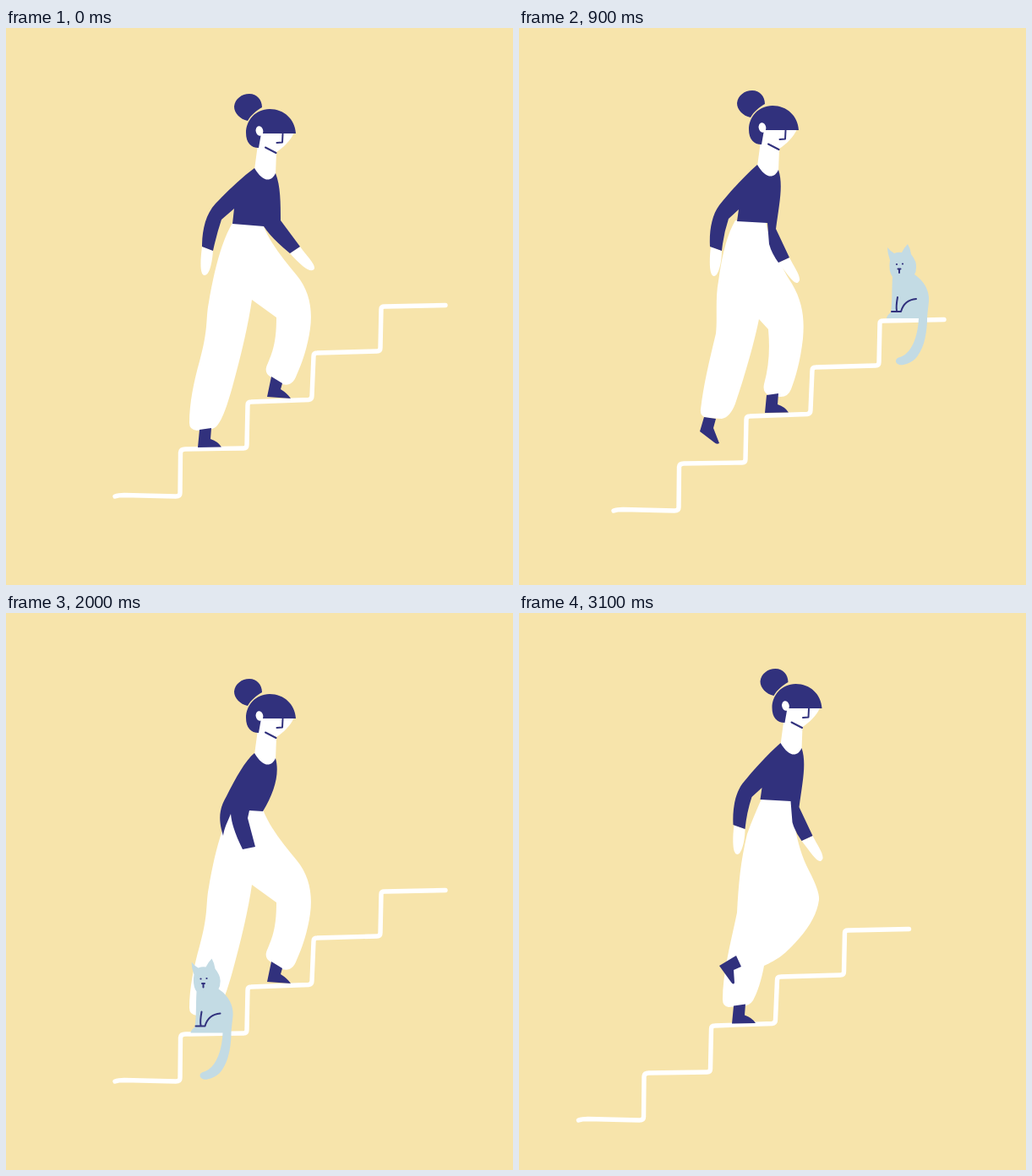
Animation, 600 px wide and 660 px high, one loop 3.2 s. Source, as an HTML page:

```html
<!DOCTYPE html>
<html lang="en">
<head>
<meta charset="utf-8">
<title>Climbing stairs</title>
<style>
  html, body { margin: 0; width: 100%; height: 100%; overflow: hidden; background: #f7e4ab; }
  svg { display: block; width: 100vw; height: 100vh; }
  .white { fill: #fff; }
  .navy { fill: #31317d; }
  .ink { fill: none; stroke: #31317d; stroke-width: 2; stroke-linecap: round; stroke-linejoin: round; }
  .stairs { fill: none; stroke: #fff; stroke-width: 5.4; stroke-linecap: round; stroke-linejoin: round; }
  .fur { fill: #c3dbe4; }
</style>
</head>
<body>
<svg viewBox="0 0 600 660">
  <path id="stairs" class="stairs" d="M129 555Q133 553.5 140 553.5L201 555Q206 555 206 551L206.5 503Q207 499 212 499L281 498Q285 498 285 494L286 447Q286 443 290 443L358 440.500Q362 440 362 436L364 389Q364 385 368 385L439 383Q443 383 443 379L444 333Q444 330 448 330L520 328.500"/>
  <path id="pants" class="white"/>
  <path id="stanceFoot" class="navy" d="M229 476L243 474L242 487Q251 490 255 496.500L227 497Z"/>
  <path id="swingFoot" class="navy"/>
  <g id="upper">
    <path id="hands" class="white"/>
    <path class="white" d="M298 122L341 124C337 133 328 142 320 147L319 174C317 184 303 184 294 168L298 138Z"/>
    <path class="navy" d="M286 110C277 108 270 101 270 93C271 84 279 78 288 78C297 78 303 85 303 94C296 98 290 103 286 110Z"/>
    <path class="navy" d="M343 125C342 108 329 96 312 96C295 96 284 110 284 124C284 136 290 142 299 142L302 125Z"/>
    <ellipse class="white" cx="300" cy="122" rx="4.300" ry="5.800" transform="rotate(-12 300 122)"/>
    <path class="ink" d="M327.500 125.500L327 135.500L320.500 136M307 141.500L319.500 148"/>
    <path id="shirt" class="navy"/>
  </g>
  <g id="cat">
    <path class="fur" d="M374 298Q378 303 382 305Q387 303 391 304Q394 298 398 294Q401 299 402 306Q409 315 408 322Q408 327 406 330C418 338 424 350 423 362C422 372 421 378 421 386C420 405 416 420 407 430C400 436 392 438 388 437C382 435 383 429 389 428C402 424 410 405 411 382L373 382Q373 379 378 375C380 362 379 350 380 333Q375 326 377 313Q374 305 374 298Z"/>
    <circle class="navy" cx="385" cy="318" r="1.100"/>
    <circle class="navy" cx="392" cy="317.500" r="1.100"/>
    <path class="ink" stroke-width="1.800" d="M386.500 323.500H389.500M388 323.500V328M386 357Q384 368 385 373M379 374H390Q394 360 408 359"/>
  </g>
</svg>
<script>
const FRAME = 100, FRAMES = 32, STEP = 4;
const el = id => document.getElementById(id);
const draw = (id, d) => el(id).setAttribute('d', d);
const move = (id, [x, y]) => el(id).setAttribute('transform', `translate(${x} ${y})`);

// Four phases of one stride
const phases = [
  {
    stairs: [0, 0], body: [0, 0], stance: [0, 0],
    pants: 'M268 231L304 233C313 256 330 276 344 293C359 311 363 333 360 356C357 378 350 398 344 411C340 422 334 424 327 422L314 414C307 410 306 405 310 397C317 381 320 368 320 343L291 322C287 350 279 385 268 425C262 446 257 462 250 471Q246 476 240 475L226 477Q217 476 217 468C217 445 222 420 229 395C240 355 236 345 240 325C246 290 254 255 268 231Z',
    foot: 'M314 413L327 421L325 428Q333 433 337 439L309 437Z'
  },
  {
    stairs: [-17, 17], body: [-12, -4], stance: [64, -41],
    pants: 'M256 228L292 230C297 255 311 285 323 303C336 325 338 345 336 368C333 395 327 415 322 428Q318 438 308 437L295 435Q288 431 290 422C296 400 297 380 295 357L284 345C279 370 268 410 256 445Q250 461 240 463L222 462Q214 460 215 452C218 425 225 395 233 362C235 345 232 320 236 300C240 270 246 245 256 228Z',
    foot: 'M219 461L233 463L230 474L237 492Q234 494 231 491L214 478Z'
  },
  {
    stairs: [-35, 32.5], body: [-17, -12], stance: [46.5, -25],
    pants: 'M250 224L286 224C290 255 297 290 306 325C313 345 313 360 311 378C309 400 305 430 301 441Q297 450 288 449L276 450Q270 449 270 443L268 398C263 412 254 432 245 441Q240 446 232 445Q220 443 221 434C225 405 231 375 237 342C233 315 232 290 232 262L244 260L247 232Z',
    foot: 'M225 443L239 446L236 457L243 474Q241 477 237 474L220 461Z'
  },
  {
    stairs: [-58.5, 46], body: [15.5, -12], stance: [25, -10.5],
    pants: 'M287 220L322 222C325 250 330 280 343 305Q356 330 355 340C353 355 345 370 332 385C315 405 305 411 290 418C287 435 282 450 277 459Q272 467 260 466L248 467Q241 466 241 458C241 425 252 385 258 355C260 320 262 295 270 262C276 245 282 232 287 220Z',
    foot: 'M237 418L257 406L263 419L254 423L255 438Q254 442 250 436Z'
  }
];

// Arm swing, from arms together to arms apart; all share the collar
const collar = 'M294 166C304 183 314 183 319 172';
const swings = [
  {
    shirt: 'C324 190 318 212 304 235L288 234L286 243L295 277L280 280C272 264 267 250 266 238C262 248 258 255 257 264C251 245 252 232 261 217C272 195 283 175 294 166Z',
    hands: ''
  },
  {
    shirt: 'C325 192 320 214 313 240L322 276L308 282C298 266 290 250 288 238L268 238C265 250 264 260 262 270L249 267C247 248 249 232 257 216C270 194 282 176 294 166Z',
    hands: 'M308 282L322 276C327 288 332 300 329 305C324 308 316 298 308 282Z'
  },
  {
    shirt: 'C326 190 322 212 317 243L332 277L320 283Q306 269 304 256L303 237L267 237L269 229L264 234Q261 252 261 272L245 269C243 252 244 231 253 217C265 198 279 178 294 166Z',
    hands: 'M247 269L261 272L260 290Q249 284 247 269ZM320 283L332 277C338 290 344 300 343 306C339 313 331 304 320 283Z'
  },
  {
    shirt: 'C325 190 320 212 316 242L332 276L319 282Q311 271 308 260L306 235L270 233L272 219L260 230Q254 248 252 268L238 263C237 245 240 226 249 214C262 198 279 179 294 166Z',
    hands: 'M239 263L252 268C252 282 248 298 243 298C237 298 237 280 239 263ZM319 282L332 276C337 286 345 297 344 303C340 312 333 300 319 282Z'
  },
  {
    shirt: 'C325 187 325 208 325 228L348 259L336 267Q314 249 305 235L268 232L270 214L255 227Q249 245 245 264L232 259C232 240 236 221 248 208C262 193 278 178 294 166Z',
    hands: 'M232 259L245 264C244 278 241 293 235 293C229 293 230 275 232 259ZM336 267L348 259C356 270 366 280 365 285C362 291 352 285 336 267Z'
  }
];

// The cat sits one tread lower on each stride
const CAT_IN = 8, CAT_OUT = 27;
const catSeats = [[79, -55], [0, 0], [-76, 59], [-154.5, 115.5], [-234.5, 170]];

let shown = -1;
function render(frame) {
  if (frame === shown) return;
  shown = frame;
  const phase = phases[frame % STEP];
  const swing = swings[Math.abs(STEP - frame % (2 * STEP))];

  move('stairs', phase.stairs);
  move('upper', phase.body);
  move('stanceFoot', phase.stance);
  draw('pants', phase.pants);
  draw('swingFoot', phase.foot);
  draw('shirt', collar + swing.shirt);
  draw('hands', swing.hands);

  const visible = frame >= CAT_IN && frame < CAT_OUT;
  el('cat').style.display = visible ? '' : 'none';
  if (visible) {
    const seat = catSeats[Math.floor((frame - CAT_IN) / STEP)];
    move('cat', seat.map((v, i) => v + phase.stairs[i]));
  }
}

const start = performance.now();
function tick() {
  render(Math.floor((performance.now() - start) / FRAME) % FRAMES);
  requestAnimationFrame(tick);
}
tick();
</script>
</body>
</html>
```
